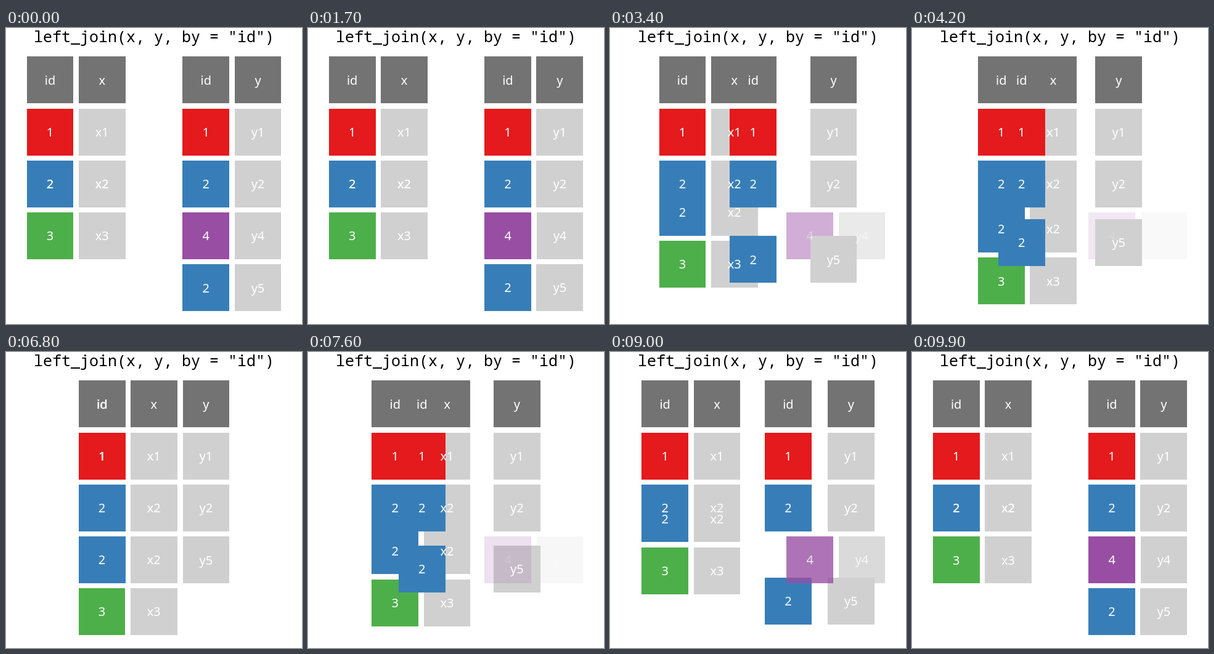
An HTML page that plays this animation: 480 px wide and 480 px high, repeating every 10000 ms.

```html
<!DOCTYPE html>
<html lang="en">
<head>
<meta charset="utf-8">
<title>left_join</title>
<style>
html, body { margin: 0; width: 100%; height: 100%; overflow: hidden; background: #fff; }
svg { display: block; width: 100%; height: 100%; }
text { text-anchor: middle; white-space: pre; }
.title { font: 25px "Noto Sans Mono", "DejaVu Sans Mono", monospace; font-variant-ligatures: none; }
.labels { font: 20px "Noto Sans", "Open Sans", sans-serif; fill: #fff; }
</style>
</head>
<body>
<svg viewBox="0 0 480 480">
  <text class="title" x="240" y="23">left_join(x, y, by = "id")</text>
  <g id="left"></g>
  <g id="gone"></g>
  <g id="right"></g>
  <g class="labels" id="labels"></g>
</svg>
<script>
const LOOP = 10000, STEP = 100;
const PITCH = 84.25, SIZE = 75.83, TOP = 84.37;
const HEAD = '#737373', CELL = '#d0d0d0', RED = '#e41a1c',
      BLUE = '#377eb8', GREEN = '#4daf4a', PURPLE = '#984ea3';

const byId = id => document.getElementById(id);
const left = byId('left'), gone = byId('gone'), right = byId('right'), labels = byId('labels');

function add(parent, tag, attrs) {
  const el = document.createElementNS('http://www.w3.org/2000/svg', tag);
  for (const k in attrs) el.setAttribute(k, attrs[k]);
  return parent.appendChild(el);
}

const cells = [];

// Columns count from the stage centre, rows from the header.
function cell(layer, text, fill, col, row, colTo, rowTo) {
  const rect = add(layer, 'rect', { fill });
  const label = add(labels, 'text', {});
  label.textContent = text;
  cells.push({ rect, label, col, row, colTo, rowTo,
    fades: layer === gone, merges: layer === right && text === '2' });
}

// Each row: key, value, key colour, start row, end row.
const leftRows = [
  ['id', 'x', HEAD, 0, 0],
  ['1', 'x1', RED, 1, 1],
  ['2', 'x2', BLUE, 2, 2],
  ['2', 'x2', BLUE, 2, 3],
  ['3', 'x3', GREEN, 3, 4]
];
const rightRows = [
  ['id', 'y', HEAD, 0, 0],
  ['1', 'y1', RED, 1, 1],
  ['2', 'y2', BLUE, 2, 2],
  ['2', 'y5', BLUE, 4, 3]
];

for (const [key, val, color, from, to] of leftRows) {
  cell(left, key, color, -2, from, -1, to);
  cell(left, val, from ? CELL : HEAD, -1, from, 0, to);
}
cell(gone, '4', PURPLE, 1, 3, 1, 3);
cell(gone, 'y4', CELL, 2, 3, 2, 3);
for (const [key, val, color, from, to] of rightRows) {
  cell(right, key, color, 1, from, -1, to);
  cell(right, val, from ? CELL : HEAD, 2, from, 1, to);
}

function place(rect, cx, cy) {
  const x = Math.round(cx - SIZE / 2), y = Math.round(cy - SIZE / 2);
  rect.setAttribute('x', x);
  rect.setAttribute('y', y);
  rect.setAttribute('width', Math.round(cx + SIZE / 2) - x);
  rect.setAttribute('height', Math.round(cy + SIZE / 2) - y);
}

const ease = t => (1 - Math.cos(Math.PI * Math.min(1, Math.max(0, t)))) / 2;
const mix = (a, b, p) => a + (b - a) * p;

function draw(ms) {
  const back = ms > 6700;
  const p = back ? 1 - ease((ms - 6700) / 3300) : ease((ms - 1600) / 3400);

  // The unmatched row lies under the moving table, and over it on the way back.
  left.parentNode.insertBefore(gone, back ? labels : right);

  for (const c of cells) {
    const x = 240 + PITCH * mix(c.col, c.colTo, p);
    const y = TOP + PITCH * mix(c.row, c.rowTo, p);
    place(c.rect, x, y);
    c.label.setAttribute('x', x);
    c.label.setAttribute('y', y + 7.2);
    const alpha = c.fades ? 1 - p : 1;
    c.rect.setAttribute('opacity', alpha);
    c.label.setAttribute('opacity', c.merges && p > 0.995 ? 0 : alpha);
  }
}

const start = performance.now();
let last = -1;
function tick() {
  const ms = Math.floor((performance.now() - start) % LOOP / STEP) * STEP;
  if (ms !== last) draw(last = ms);
  requestAnimationFrame(tick);
}
tick();
</script>
</body>
</html>
```
